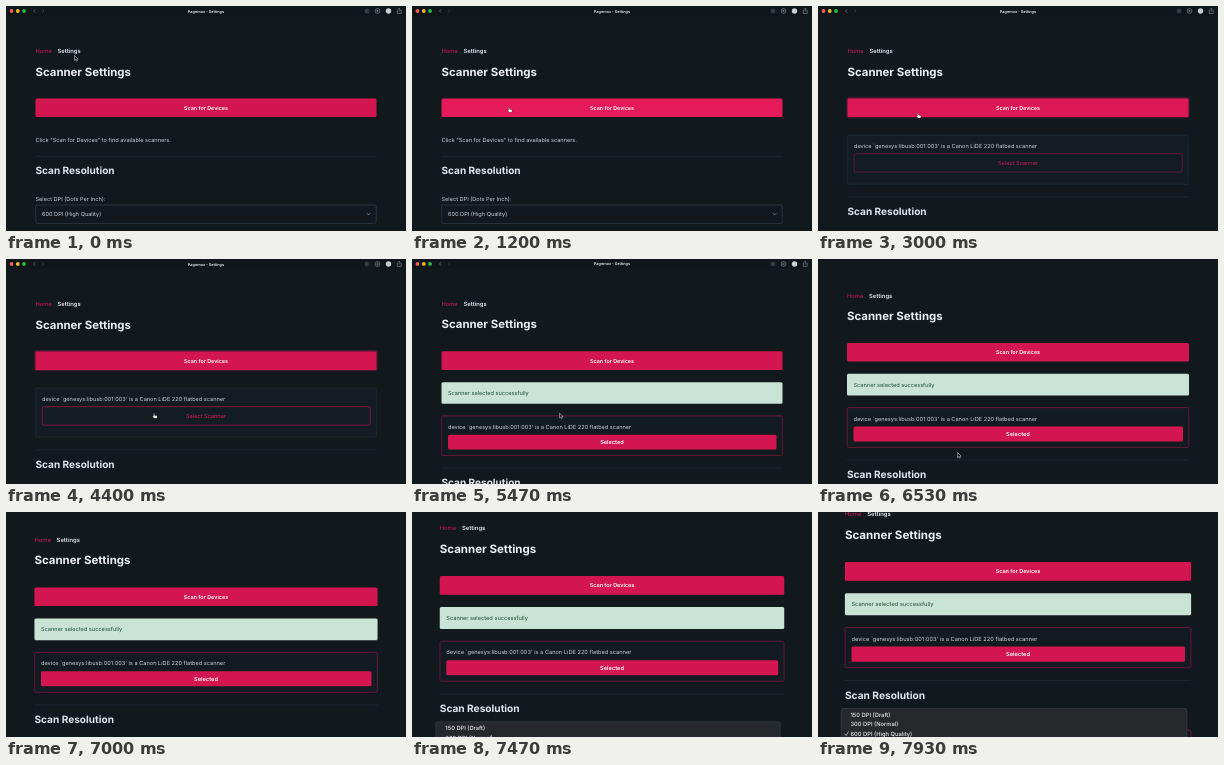
An HTML page for the animation above (8000 ms loop, 400 px wide and 225 px high).

```html
<!DOCTYPE html>
<html lang="en">
<head>
<meta charset="utf-8">
<title>Settings</title>
<style>
  html, body { margin: 0; width: 100%; height: 100%; overflow: hidden; background: #11191d; }
  svg { display: block; width: 100vw; height: 100vh; }
  text { font: 5.6px Inter, "Open Sans", sans-serif; fill: #c6d0d6; text-rendering: geometricPrecision; }
  .bold { font-weight: 600; fill: #e6eaee; }
  .h1 { font-size: 11.4px; font-weight: 700; fill: #edf0f3; }
  .h2 { font-size: 10.05px; font-weight: 700; fill: #e1e6eb; }
  .mid { text-anchor: middle; }
  .bar { font-size: 3.85px; }
  .option { font-size: 5.7px; font-weight: 500; fill: #e8eaec; }
  .line { fill: none; stroke-width: .6; }
</style>
</head>
<body>
<svg viewBox="0 0 400 225">
  <rect width="400" height="225" fill="#11191d"/>
  <g id="page">
    <!-- window bar -->
    <rect x="-5" y="-5" width="410" height="15" fill="#10161a"/>
    <circle cx="5.5" cy="5" r="1.9" fill="#f45f57"/>
    <circle cx="11.8" cy="5" r="1.9" fill="#f0b72f"/>
    <circle cx="18" cy="5" r="1.9" fill="#2dbd43"/>
    <path class="line" stroke="#7b8388" d="M29.2 3.2L27.5 5l1.7 1.8"/>
    <path class="line" stroke="#454d52" d="M36.3 3.2L38 5l-1.7 1.8"/>
    <text class="bold mid bar" x="200" y="6.5">Pagemox - Settings</text>
    <g class="line" stroke="#8d9499">
      <circle cx="361" cy="5" r="1.9" stroke="#5f676c"/>
      <circle cx="361" cy="5" r=".7" stroke="#5f676c"/>
      <circle cx="371.5" cy="5" r="2.4"/>
      <path d="M371 4l1.5 1-1.5 1z"/>
      <path d="M392 4.2h-.8v3.2h4V4.2h-.8M393.2 5.6V2.2m-1 1l1-1 1 1"/>
    </g>
    <circle cx="382.5" cy="5" r="2.7" fill="#c9ced1"/>

    <text x="29.5" y="47.3" style="fill:#d2175a;font-size:5.8px">Home</text>
    <text class="bold" x="51.5" y="47.3" style="font-size:5.8px">Settings</text>
    <text class="h1" x="29.5" y="69.5">Scanner Settings</text>

    <rect id="ring" x="29" y="91.9" width="342" height="19.6" rx="2" fill="none" stroke="#d81b60" stroke-opacity=".28" stroke-width="1.6"/>
    <rect id="scan" x="29.5" y="92.4" width="341" height="18.6" rx="1.5"/>
    <text class="bold mid" x="200" y="103.7" style="font-size:5.4px;fill:#fff">Scan for Devices</text>

    <g id="empty">
      <text x="29.5" y="135.5">Click "Scan for Devices" to find available scanners.</text>
    </g>

    <g id="found">
      <rect x="29.7" y="129.2" width="340.6" height="49" rx="1.5" fill="#121c22" stroke="#22323c" stroke-width=".6"/>
      <text x="36" y="142.2">device `genesys:libusb:001:003' is a Canon LiDE 220 flatbed scanner</text>
      <rect id="pick" class="line" x="36.2" y="147.7" width="328" height="18.4" rx="1.5"/>
      <text id="pickText" class="mid" x="200" y="158.9">Select Scanner</text>
    </g>

    <g id="chosen">
      <rect x="29.5" y="123.2" width="341" height="21.7" rx="1.5" fill="#c9e3d6"/>
      <text x="36" y="136.2" style="fill:#1c5039">Scanner selected successfully</text>
      <rect x="29.7" y="156.9" width="340.6" height="39.7" rx="1.5" fill="#121b20" stroke="#9c1744" stroke-width=".6"/>
      <text x="36" y="170">device `genesys:libusb:001:003' is a Canon LiDE 220 flatbed scanner</text>
      <rect x="36" y="175.7" width="328.5" height="14.9" rx="1.5" fill="#d31652"/>
      <text class="bold mid" x="200" y="185.1" style="fill:#fff">Selected</text>
    </g>

    <g id="resolution">
      <path class="line" stroke="#222e36" d="M29.5 150.3h341"/>
      <text class="h2" x="29.5" y="168.2">Scan Resolution</text>
      <text x="29.5" y="194.7">Select DPI (Dots Per Inch):</text>
      <rect id="select" x="29.8" y="199" width="340.4" height="18.4" rx="1.5" fill="#11191f" stroke-width=".6"/>
      <text x="36" y="210.2">600 DPI (High Quality)</text>
      <path class="line" stroke="#aab4bb" d="M360.8 207.2l1.7 1.7 1.7-1.7"/>
    </g>

    <g id="menu">
      <rect x="25.7" y="236.7" width="340.7" height="60" rx="2" fill="#25292c" stroke="#464b4e" stroke-width=".5"/>
      <text class="option" x="35" y="245">150 DPI (Draft)</text>
      <text class="option" x="35" y="254.3">300 DPI (Normal)</text>
      <text class="option" x="35" y="263.6">600 DPI (High Quality)</text>
      <path class="line" stroke="#e8eaec" d="M29.2 261.6l1.5 1.8 2.5-4"/>
    </g>
  </g>

  <g id="cursor" stroke-linejoin="round">
    <path id="arrow" d="M0 0v5l1.2-1.1.8 1.8.9-.4-.8-1.7h1.6z" fill="#000" stroke="#e4e7e9" stroke-width=".5"/>
    <path id="hand" d="M0 .5q.5-.7 1 0v1.7l2.1.5q.7.2.6.9l-.4 1.7H.7L-.9 3.4q0-.7.9-.2z" fill="#fff" stroke="#111" stroke-width=".35"/>
  </g>
</svg>
<script>
const LOOP = 8000, CLICK_SCAN = 1400, FOUND = 1870, CHOSEN = 4730, PAN = 5400, MENU = 7400;

// cursor tip: time, x, y
const path = [
  [0, 68.5, 49.5], [870, 96.5, 101], [1870, 96.5, 101], [2330, 97.5, 105],
  [2870, 97.5, 105], [4000, 147.5, 154], [6200, 147.5, 154], [6900, 130, 240], [LOOP, 130, 240]
];

const $ = id => document.getElementById(id);
const show = (id, on) => { $(id).style.display = on ? "" : "none"; };
const set = (id, name, value) => $(id).setAttribute(name, value);
const ease = p => p * p * (3 - 2 * p);

function cursorAt(t) {
  const i = path.findIndex(p => p[0] > t);
  const [t0, x0, y0] = path[i - 1], [t1, x1, y1] = path[i];
  const k = ease((t - t0) / (t1 - t0));
  return [x0 + (x1 - x0) * k, y0 + (y1 - y0) * k];
}

function draw(t) {
  const found = t >= FOUND && t < CHOSEN, chosen = t >= CHOSEN;
  const [x, y] = cursorAt(t);
  const overScan = !chosen && y > 92 && y < 111;
  const overPick = found && y > 147 && y < 166;

  show("empty", t < FOUND);
  show("found", found);
  show("chosen", chosen);
  show("menu", t >= MENU);
  show("ring", t >= CLICK_SCAN && t < CHOSEN);
  set("scan", "fill", !overScan ? "#d31652" : t < CLICK_SCAN ? "#e51a5a" : "#dc1857");
  set("pick", "stroke", overPick ? "#c2184f" : "#8c1643");
  $("pickText").style.fill = overPick ? "#e01c5c" : "#cf1957";
  set("select", "stroke", t >= MENU ? "#b01749" : "#374650");
  set("resolution", "transform", `translate(0 ${chosen ? 58.9 : found ? 40.6 : 0})`);

  // camera drifts up while zooming in slightly
  const u = Math.max(0, (t - PAN) / 1000) ** 2, s = 1 + .0024 * u;
  set("page", "transform", `translate(${200 * (1 - s)} ${-6.85 * u}) scale(${s})`);

  set("cursor", "transform", `translate(${x} ${y})`);
  show("hand", overScan || overPick);
  show("arrow", !(overScan || overPick));
}

const start = performance.now();
function tick() {
  draw((performance.now() - start) % LOOP);
  requestAnimationFrame(tick);
}
tick();
</script>
</body>
</html>
```
